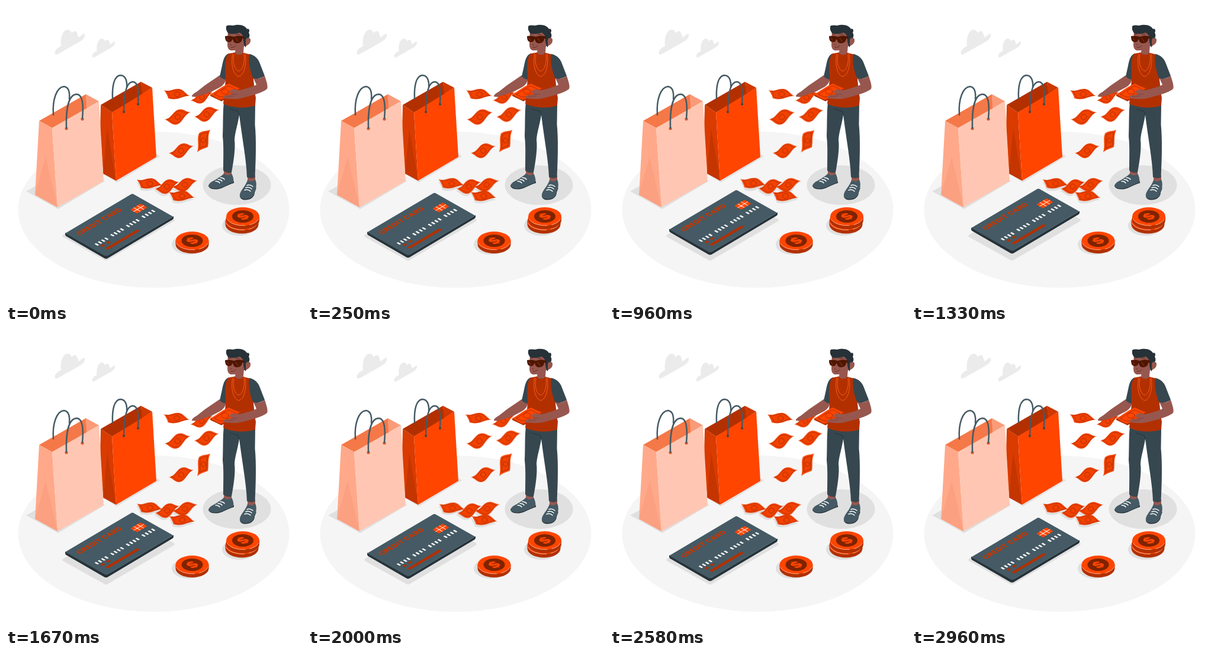
Recreate the animation shown at these times as an HTML page. Size 500 by 500 pixels, loop 3 s.

```html
<!DOCTYPE html>
<html lang="en">
<head>
<meta charset="utf-8">
<title>Shopping</title>
<style>
html, body { margin: 0; width: 100%; height: 100%; overflow: hidden; background: #fff; }
svg { display: block; width: 100%; height: 100%; }
.hot { fill: #ff4500; }
.note { fill: #f24100; }
.deep { fill: #b23000; }
.slate { fill: #37474f; }
.skin { fill: #97574e; }
.shade { fill: #e0e0e0; }
.line { fill: none; stroke-linecap: round; stroke-linejoin: round; }
.handle { stroke: #455a64; stroke-width: 2.5; }
.print { stroke: #a62d00; stroke-width: .9; }
.lace { stroke: #fff; stroke-width: 1.5; }
#card { animation: float 3s linear infinite; }
#bills { transform-origin: 290px 236px; animation: wind 3s linear infinite; }
@keyframes float { 50% { transform: translateY(-10px); } }
@keyframes wind {
  0%, 100% { transform: rotate(0deg); }
  25% { transform: rotate(1deg); }
  75% { transform: rotate(-1deg); }
}
</style>
</head>
<body>
<svg viewBox="0 0 500 500">
<defs>
  <path id="cloud" fill="#ebebeb" d="M0 41C-2 37 2 31 10 28C8 14 13 0 21 0C25 0 27 3 28 6C30 2 36 1 37 6C38 9 39 10 39 13C43 12 46 6 50 7C51 13 47 17 42 20L5 41Q1 43 0 41Z"/>
  <path id="rise" d="M-22 4C-10 4-8-13 5-13C11-13 15-8 22-8C11-6 8 13-4 13C-11 13-14 7-22 4Z"/>
  <path id="dip" d="M-22-7C-13-3-7-10 3-9C12-8 15 1 22 3C14 2 7 7-1 8C-7 9-11 8-15 7C-16 2-19-3-22-7Z"/>
  <g id="up">
    <use href="#rise" class="note"/>
    <use href="#rise" class="line print" transform="scale(.8)"/>
    <circle class="line print" r="4.6"/>
  </g>
  <g id="down">
    <use href="#dip" class="note"/>
    <use href="#dip" class="line print" transform="scale(.8)"/>
    <ellipse class="line print" rx="4.8" ry="4.2"/>
  </g>
  <g id="rim">
    <path class="deep" d="M-28 0V6A28 15.5 0 0 0 28 6V0Z"/>
    <ellipse class="hot" rx="28" ry="15.5"/>
    <path class="line" stroke="#ffc7b3" stroke-width=".8" d="M-26.5 4.5A28 15.5 0 0 0 4 15.3M12 14A28 15.5 0 0 0 26.5 4.5"/>
  </g>
  <g id="coin">
    <use href="#rim"/>
    <ellipse fill="#7f2300" rx="18" ry="10.5"/>
    <text class="hot" transform="matrix(.866 -.5 .866 .5 0 0)" y="7.6" text-anchor="middle" font-family="Inter, Arial, sans-serif" font-size="21" font-weight="900">$</text>
  </g>
</defs>

<ellipse cx="249.5" cy="344" rx="229" ry="132" fill="#f5f5f5"/>
<use href="#cloud" x="83" y="40"/>
<use href="#cloud" transform="translate(146 55) scale(.76)"/>

<!-- ground shadows -->
<g class="shade">
  <ellipse cx="390" cy="302.5" rx="57.5" ry="33.5"/>
  <path d="M34 313L52 303L168 295L88 343Z"/>
  <path d="M160 281L254 250L260 254L187 298Z"/>
  <path d="M97 386L213 320L284 360Q286 362 283 364L172 429Q169 431 166 429L96 390Q94 388 97 386Z"/>
  <ellipse cx="309" cy="403" rx="29" ry="17"/>
  <ellipse cx="394" cy="371" rx="29" ry="17"/>
  <use href="#dip" x="242" y="304"/>
  <use href="#rise" x="271" y="308"/>
  <use href="#rise" x="301" y="305"/>
  <use href="#dip" x="296.5" y="325"/>
</g>

<!-- rear bag -->
<path class="deep" d="M160 167L228 128L231 149L179 180Z"/>
<path fill="#cf3800" d="M228 128L247 138L230 149Z"/>
<path class="line handle" d="M180 156C179 134 183 118 193 117C201 117 205 125 204 138"/>
<path fill="#d93b00" d="M160 167L179 180L186 295L164 283L159 215Z"/>
<path fill="#c43500" d="M171 208L186 295L164 283Z"/>
<path class="hot" d="M179 180L247 138L254 255L186 295Z"/>
<path class="line handle" d="M199 178C199 149 203 129 214 128C224 128 224 146 223 165"/>
<g class="slate"><circle cx="199" cy="179" r="2"/><circle cx="223" cy="166" r="2"/></g>

<!-- front bag -->
<path fill="#f57848" d="M56 194L135 149L137 173L78 206Z"/>
<path fill="#f99b79" d="M135 149L157 161L136 173Z"/>
<path class="line handle" d="M80 184C78 157 86 137 98 136C106 137 108 145 107 157"/>
<path fill="#ffa98a" d="M56 194L78 206L87 340L49 319Z"/>
<path fill="#fba080" d="M67 255L87 340L49 319Z"/>
<path fill="#ffc7b3" d="M78 206L157 161L165 296L87 340Z"/>
<g fill="#e0562a"><circle cx="102" cy="207" r="2.6"/><circle cx="129" cy="191" r="2.6"/></g>
<path class="line handle" d="M102 206C101 173 106 150 119 149C130 149 131 169 129 190"/>

<!-- credit card -->
<g id="card">
  <path fill="#263238" d="M100 383V386Q100 388 102 389L166 426Q169 428 172 426L281 361Q283 360 283 358V355L169 418Z"/>
  <g transform="matrix(.863 -.511 .87 .492 100 384)">
    <rect width="131.5" height="79" rx="2" fill="#455a64"/>
    <path class="line" stroke="#607d8b" stroke-width=".7" d="M3 79H129"/>
    <text x="10" y="18.4" fill="#c73600" font-family="Inter, Arial, sans-serif" font-size="12" font-weight="800" letter-spacing=".3">CREDIT CARD</text>
    <rect class="hot" x="102.3" y="25" width="20" height="13" rx="1.5"/>
    <path class="line" stroke="#ffe3d9" stroke-width="1.2" d="M102.5 31.5H122M109 25.5V37.5M115.6 25.5V37.5"/>
    <path fill="none" stroke="#fff" stroke-width="6" stroke-dasharray="2.8 3.5 2.8 3.5 2.8 3.5 2.8 8.8" d="M10 50H123.5"/>
    <g fill="#b23000">
      <rect x="12" y="56" width="6" height="4" rx="1"/>
      <rect x="23" y="56" width="6" height="4" rx="1"/>
      <rect x="13" y="65" width="63" height="5" rx="1.5"/>
    </g>
  </g>
</g>

<use href="#coin" x="314.5" y="396.5"/>
<use href="#rim" x="398.5" y="363"/>
<use href="#coin" x="400" y="355.5"/>

<!-- far arm -->
<path class="skin" d="M361 117L372 123C370 130 367 134 362 137L341 148C335 153 325 155 314 153C314 150 318 147 322 145L336 134Z"/>

<g id="bills">
  <use href="#down" x="289" y="149"/>
  <use href="#up" x="290" y="187.5"/>
  <use href="#up" transform="translate(339 183) scale(.96)"/>
  <use href="#up" transform="translate(296 244.5) scale(.96)"/>
  <use href="#up" transform="translate(331 154) rotate(-6) scale(.9 .8)"/>
  <path class="note" d="M326 215C332 210 338 212 345 209C340 220 343 228 341 238C335 241 328 242 323 247C327 235 322 225 326 215Z"/>
  <path class="line print" d="M329 217C333 214 337 215 341 213C338 221 340 229 338 236C334 237 330 238 327 241C329 233 326 224 329 217Z"/>
  <circle class="line print" cx="333.5" cy="227" r="4"/>
  <use href="#down" x="243" y="300"/>
  <use href="#up" transform="translate(272 305) scale(.95)"/>
  <use href="#up" transform="translate(302 302) scale(.98 .88)"/>
  <use href="#down" x="297.5" y="321"/>
</g>

<!-- hand over the falling bill -->
<path class="skin" d="M314 152C317 147 324 145 331 141L347 136L348 144C338 148 326 154 314 152Z"/>

<!-- legs and shoes -->
<path class="skin" d="M368 276H381V287L373 290L368 285ZM408 286H421V298L414 301L408 296Z"/>
<path fill="#263238" d="M342 304C344 309 350 310 357 309.500C367 308 374 302 385 299V296L343 301ZM395 320C395 326 400 328 406 327.500C415 327 420 321 420 315L423 307Z"/>
<path fill="#455a64" d="M343 302C344 297 353 295 359 290C363 288 366 285 368 283C372 287 377 287 381 283C384 288 385 295 384 298C374 301 367 307 356 308C348 309 342 307 343 302Z"/>
<path fill="#455a64" d="M395 318C397 310 405 304 408 294C412 297 417 297 421 293C424 300 423 307 420 313C419 321 414 326 405 326C398 326 394 323 395 318Z"/>
<path class="line lace" d="M354 296Q359 296 361 299M358 293Q363 293 365 296M362 290Q367 290 369 293M403 311Q409 309 413 313M405 307Q411 305 415 309M407 303Q412 301 417 305"/>
<path class="slate" d="M368 163C380 171 408 173 421 167L420.500 200C423 225 422 260 420.500 289C417 292 411 291 407 289C406 260 399 224 394 184C391 203 387 212 386 226C388 241 384 265 381 281C377 283 371 281 367 278C367 254 368 238 366 220C367 198 366 180 368 163Z"/>
<path class="line" stroke="#263238" stroke-width="1" d="M394 184L392 178L379 174"/>

<!-- torso -->
<path class="slate" d="M377 80C369 82 367 91 365 101L361 119Q366 124 372 124L379 101Z"/>
<path class="deep" d="M375 81C381 79 385 79 389 78L401 79L413 82C414 95 414 106 417 116C419 130 420 145 422 155L421 168C405 174 380 172 367 165L371 124C371 108 368 92 375 81Z"/>
<path class="slate" d="M411 81C421 83 427 90 430 100L437 118C432 122 424 124 418 123C412 111 409 93 411 81Z"/>
<path class="skin" d="M388 68L402 66L401 78C400 83 389 84 387 79Z"/>
<path class="line" stroke="#ff5a1a" stroke-width="1" d="M383 81C379 98 384 117 393 119C402 118 407 98 404 81M385 82C382 95 386 108 393 110C400 109 404 94 402 82"/>

<!-- cash stack and near arm -->
<path class="deep" d="M345 149L363 157L395 139V143L364 161L345 152Z"/>
<path class="hot" d="M345 149C355 145 364 135 377 131C384 135 389 137 395 139C385 144 376 154 363 158C356 157 352 152 345 149Z"/>
<path class="line print" d="M352 149C360 145 367 138 376 135C381 137 385 139 389 141C380 145 373 152 364 154C359 153 356 151 352 149Z"/>
<ellipse class="line print" cx="370" cy="144.5" rx="6" ry="4.5"/>
<path class="skin" d="M418 122Q428 125 437 118C440 127 443 136 441 140C435 146 413 152 396 156C388 158 378 157 370 156C365 155 366 152 371 151L383 149C379 147 376 145 380 142C384 139 390 143 395 142C405 140 417 136 423 133Z"/>
<path class="line" stroke="#7b4039" stroke-width=".8" d="M372 153L385 152M383 149L391 149"/>

<!-- head -->
<path class="skin" d="M375 43L374 65C374 72 377 76 383 75C391 75 398 73 402 68C408 68 413 63 413 57C412 53 408 53 406 56L404 42Z"/>
<path fill="#263238" d="M372 36C371 32 377 32 384 33C394 30 404 33 407 39C411 37 412 42 410 45C412 49 412 52 409 55C406 53 405 58 406 61L405 70C401 66 401 57 400 50C398 47 396 45 394 45C387 48 379 47 375 46C374 43 371 41 372 36Z"/>
<path class="skin" d="M405 57C408 52 413 54 413 58C413 63 409 67 405 65Z"/>
<path fill="#4f1600" d="M370 51C377 50 381 51 385 52C391 50 395 50 400 51L403 53V55L399 55C399 60 395 63 390 63C385 63 384 59 383 56C381 57 382 61 377 61C371 61 370 56 370 51Z"/>
<path class="line" stroke="#9b3a1a" stroke-width=".9" d="M373 54L376 58M388 54L392 60"/>
<path class="line" stroke="#5d2d28" stroke-width="1" d="M375 48L380 47M388 48L394 48M380 70Q385 71 388 67M379 65L381 66"/>
</svg>
</body>
</html>
```
